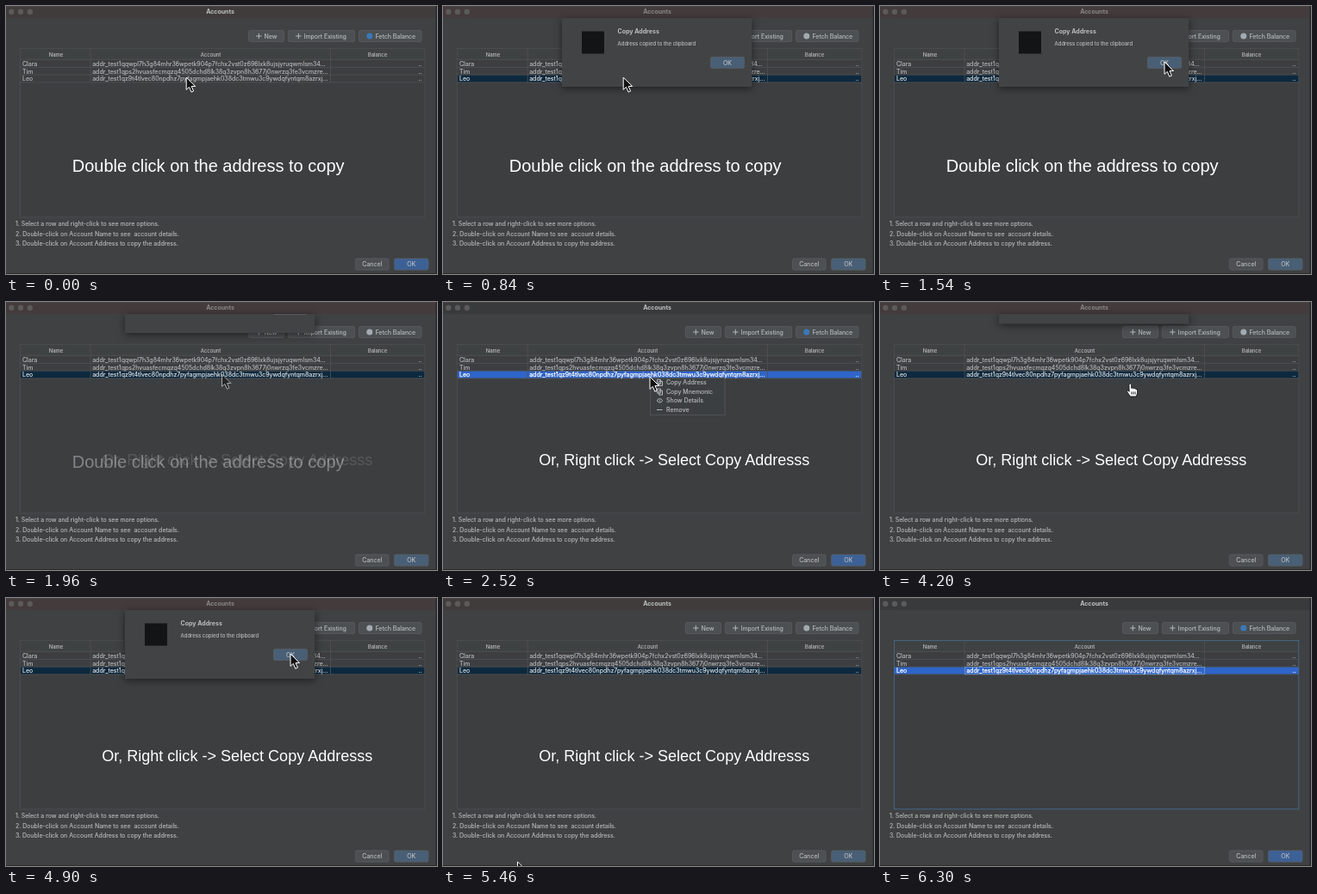
An HTML page for the animation above (6.39 s loop, 500 by 312 pixels).

```html
<!DOCTYPE html>
<html lang="en">
<head>
<meta charset="utf-8">
<title>Accounts</title>
<style>
  html, body { margin: 0; width: 100%; height: 100%; overflow: hidden; background: #3f4142; }
  svg { display: block; width: 100vw; height: 100vh; }
  text { font: 7px Inter, sans-serif; fill: #bbbdbf; stroke: #bbbdbf; stroke-width: .12; white-space: pre; }
  .bold { font-weight: 700; stroke: none; }
  .small { font-size: 6px; }
  .mid { text-anchor: middle; }
  .caption { font-family: "Liberation Sans", Arial, sans-serif; fill: #fff; stroke: none; }
  .line { fill: none; stroke: #505254; stroke-width: .8; }
  .icon { fill: none; stroke: #b4b7b9; stroke-width: 1; }
  .selected text { fill: #fff; }
  .focused text { stroke: #fff; stroke-width: .25; }
  #sheet { filter: drop-shadow(0 2px 4px rgba(0, 0, 0, .5)); }
</style>
</head>
<body>
<svg id="stage" viewBox="0 0 500 312" preserveAspectRatio="none"></svg>
<script>
const LOOP = 6390, STEP = 140;
const stage = document.getElementById('stage');

function el(tag, attrs, parent = stage) {
  const node = document.createElementNS('http://www.w3.org/2000/svg', tag);
  for (const key in attrs) node.setAttribute(key, attrs[key]);
  return parent.appendChild(node);
}
const group = (attrs = {}, parent) => el('g', attrs, parent);
const path = (d, cls, parent) => el('path', { d, class: cls }, parent);
const rect = (x, y, width, height, fill, parent, more = {}) =>
  el('rect', { x, y, width, height, fill, ...more }, parent);
function label(x, y, str, cls = '', parent) {
  const node = el('text', { x, y, class: cls }, parent);
  node.textContent = str;
  return node;
}
function button(x, y, w, fill, str, textX, parent) {
  const box = rect(x + .4, y + .4, w - .8, 13.2, fill, parent,
    { rx: 2, stroke: '#5e6163', 'stroke-width': .7 });
  label(textX ?? x + w / 2, y + 9.6, str, textX ? '' : 'mid', parent);
  return box;
}
const show = (node, on) => node.setAttribute('visibility', on ? 'visible' : 'hidden');

// Window frame
rect(0, 0, 500, 312, '#3f4142');
const titleBar = rect(0, 0, 500, 14, '#413c3c');
rect(0, 0, 500, .7, '#504647');
rect(498.6, 0, 1.4, 312, '#25292c');
rect(0, 311, 500, 1, '#2f2829');
for (const cx of [6.3, 17, 27.8]) el('circle', { cx, cy: 6.8, r: 3.2, fill: '#5c5a5b' });
const title = label(248.5, 9.4, 'Accounts', 'mid bold');

// Toolbar
button(281, 28, 42, '#4c5052', 'New', 299.5);
button(327, 28, 78, '#4c5052', 'Import Existing', 345.5);
button(409, 28, 73.5, '#4c5052', 'Fetch Balance', 428.5);
for (const x of [293.3, 339.3]) path(`M${x - 3.2} 35h6.4M${x} 31.8v6.4`, 'icon');
const coin = el('circle', { cx: 421.8, cy: 35, r: 3.5 });

// Table
rect(16, 49, 470, 197, '#3c3e40');
rect(16, 49, 470, 13.3, '#3f4243');
const selection = rect(16.5, 80.3, 469, 8.6, '#0d293e');
const frame = rect(16.4, 49.4, 469.4, 196.4, 'none', stage, { 'stroke-width': .8 });
path('M16 62.4H486M98.2 49V89M376.5 49V89M16 71.4H486M16 80.1H486M16 88.9H486', 'line');
const cellFocus = rect(98.4, 80.3, 278, 8.5, 'none', stage, { stroke: '#7fa8e6', 'stroke-width': .7 });
[[58, 'Name'], [237.5, 'Account'], [431, 'Balance']].forEach(([x, s]) => label(x, 58.6, s, 'mid small'));
const rows = [
  ['Clara', 'addr_test1qqwpl7h3g84mhr36wpetk904p7fchx2vst0z696lxk8ujsjyruqwmlsm34...'],
  ['Tim', 'addr_test1qps2hvuasfecmqzq4505dchd8lk38q3zvpn8h3677j0nwrzq3fe3vcmzre...'],
  ['Leo', 'addr_test1qz9t4tlvec80npdhz7pyfagmpjaehk038dc3tmwu3c9ywdqfyntqm8azrxj...']
].map(([name, address], i) => {
  const row = group(), y = 69.8 + i * 8.7;
  label(19, y, name, '', row);
  label(100.2, y, address, '', row);
  label(478.5, y, '..', '', row);
  return row;
});

// Footer
['1. Select a row and right-click to see more options.',
 '2. Double-click on Account Name to see  account details.',
 '3. Double-click on Account Address to copy the address.'
].forEach((s, i) => label(10.9, 256.3 + i * 11.2, s));
button(405, 293.6, 39.5, '#4c5052', 'Cancel');
const okButton = button(450, 293.6, 40.5, '#3f6399', 'OK');

// Captions
const captions = [
  label(76.8, 193, 'Double click on the address to copy', 'caption'),
  label(111.2, 190.2, 'Or, Right click -> Select Copy Addresss', 'caption')
];
captions[0].style.fontSize = '20px';
captions[1].style.fontSize = '18.05px';

// Context menu
const menu = group();
rect(240.4, 88.4, 86.6, 43, '#3c3f41', menu, { stroke: '#55585a', 'stroke-width': .8 });
const hover = rect(240.8, 0, 85.8, 10.8, '#2f65ca', menu);
const items = ['Copy Address', 'Copy Mnemonic', 'Show Details', 'Remove'].map((s, i) => {
  const y = 93.4 + i * 10.7;
  if (i < 2) path(`M248.5 ${y - 3}h4v5h-4zM250.5 ${y - 1}h4v5h-4z`, 'icon', menu);
  if (i === 2) path(`M248 ${y}q3.4 -4.4 6.8 0q-3.4 4.4 -6.8 0zM250.6 ${y}h1.6`, 'icon', menu);
  if (i === 3) path(`M248 ${y}h6.4`, 'icon', menu);
  return label(259, y + 2.5, s, '', menu);
});

// Message sheet: slides out from under the title bar
rect(138, 14, 220.5, 80, '#000', el('clipPath', { id: 'below-title' }));
const sheet = group({ id: 'sheet' });
const slider = group({}, group({ 'clip-path': 'url(#below-title)' }, sheet));
rect(138, 14, 220.5, 80, '#414344', slider);
rect(161, 29.5, 26, 26, '#121416', slider);
label(202.6, 32.3, 'Copy Address', 'bold', slider);
label(202.6, 45.6, 'Address copied to the clipboard', 'small', slider);
button(310, 59, 40, '#485f76', 'OK', undefined, slider);

// Pointers, both with the hot spot at 0,0
const arrow = el('path', {
  d: 'M0 0V14.4L3.3 11.4L5.8 17.2L8.4 16.1L6 10.5H10.5Z',
  fill: '#111', stroke: '#fff', 'stroke-width': 1, 'stroke-linejoin': 'round'
});
const hand = el('path', {
  d: 'M-1.4 1.2Q0 -1 1.4 1.2V5.4Q2.8 4 4 5.8Q5.4 4.8 6.4 6.6Q8.2 6 8.4 8V11L7 15H0L-3.6 9.6Q-4 7.6 -2.4 8L-1.2 9.4Z' +
     'M1.6 9.4V12.6M3.7 9.4V12.6M5.8 9.4V12.6',
  fill: '#fff', stroke: '#111', 'stroke-width': .9, 'stroke-linejoin': 'round'
});

// Tracks: [time, value...]
const pointer = [
  [0, 209.2, 83], [1120, 209.2, 83], [1540, 330, 65], [1680, 330, 65], [1960, 250.5, 84],
  [2240, 240, 87], [2660, 240, 87], [3220, 285.5, 110], [3500, 290.3, 95], [4480, 290.3, 95],
  [4900, 330, 65], [5040, 330, 65], [5460, 86.5, 307], [5600, 40, 335]
];
const pointerFade = [[1680, 1], [1960, .55], [2240, 1]];
const sheetBottom = [
  [560, 14], [700, 44], [840, 94], [1680, 94], [1820, 70], [1960, 36], [2100, 14],
  [4060, 14], [4200, 25.5], [4340, 70], [4480, 94], [5040, 94], [5180, 50], [5320, 14]
];
const firstCaption = [[1680, 1], [1960, .36], [2100, 0]];
const secondCaption = [[1820, 0], [1960, .13], [2380, 1], [5740, 1], [6300, 0]];

function at(track, t) {
  const next = track.findIndex(key => key[0] > t);
  if (next < 1) return (next ? track[track.length - 1] : track[0]).slice(1);
  const a = track[next - 1], b = track[next];
  const k = (t - a[0]) / (b[0] - a[0]);
  return a.slice(1).map((v, i) => v + (b[i + 1] - v) * k);
}
const within = (t, from, to) => t >= from && t < to;

function draw(t) {
  const [x, y] = at(pointer, t), [bottom] = at(sheetBottom, t);
  const selected = t >= 420;
  const active = t < 420 || within(t, 2100, 4060) || t >= 5320;
  const focused = within(t, 2380, 4060) || t >= 5600;
  const menuOpen = within(t, 2520, 3780);
  const bright = focused || !selected;

  title.style.fill = active ? '#bfc1c2' : '#8b8889';
  titleBar.setAttribute('fill', focused ? '#393a3c' : active ? '#403c3c' : '#433b3c');
  coin.setAttribute('fill', bright ? '#3b78b8' : '#a3abb1');
  okButton.setAttribute('fill', bright ? '#3d6196' : '#485f76');

  show(selection, selected);
  selection.setAttribute('fill', focused ? '#2f65ca' : '#0d293e');
  rows[2].setAttribute('class', (selected ? 'selected ' : '') + (focused ? 'focused' : ''));
  const tableFocus = focused && !menuOpen;
  frame.setAttribute('stroke', tableFocus ? '#466d94' : '#4c4e50');
  show(cellFocus, tableFocus);

  captions[0].setAttribute('opacity', at(firstCaption, t)[0]);
  captions[1].setAttribute('opacity', at(secondCaption, t)[0]);

  const index = Math.floor((y - 88) / 10.7);
  show(menu, menuOpen);
  show(hover, menuOpen && index >= 0);
  hover.setAttribute('y', 88.2 + Math.max(index, 0) * 10.7);
  items.forEach((item, i) => {
    item.setAttribute('class', i === index ? 'bold' : '');
    item.style.fill = i === index ? '#fff' : '#bbbdbf';
  });

  show(sheet, bottom > 14);
  slider.setAttribute('transform', `translate(0 ${bottom - 94})`);

  const pointing = within(t, 2800, 4480);
  show(hand, pointing);
  show(arrow, !pointing && t < 5600);
  arrow.setAttribute('opacity', at(pointerFade, t)[0]);
  for (const node of [arrow, hand]) node.setAttribute('transform', `translate(${x} ${y})`);
}

const start = performance.now();
function tick() {
  const t = (performance.now() - start) % LOOP;
  draw(Math.floor(t / STEP) * STEP);
  requestAnimationFrame(tick);
}
tick();
</script>
</body>
</html>
```
